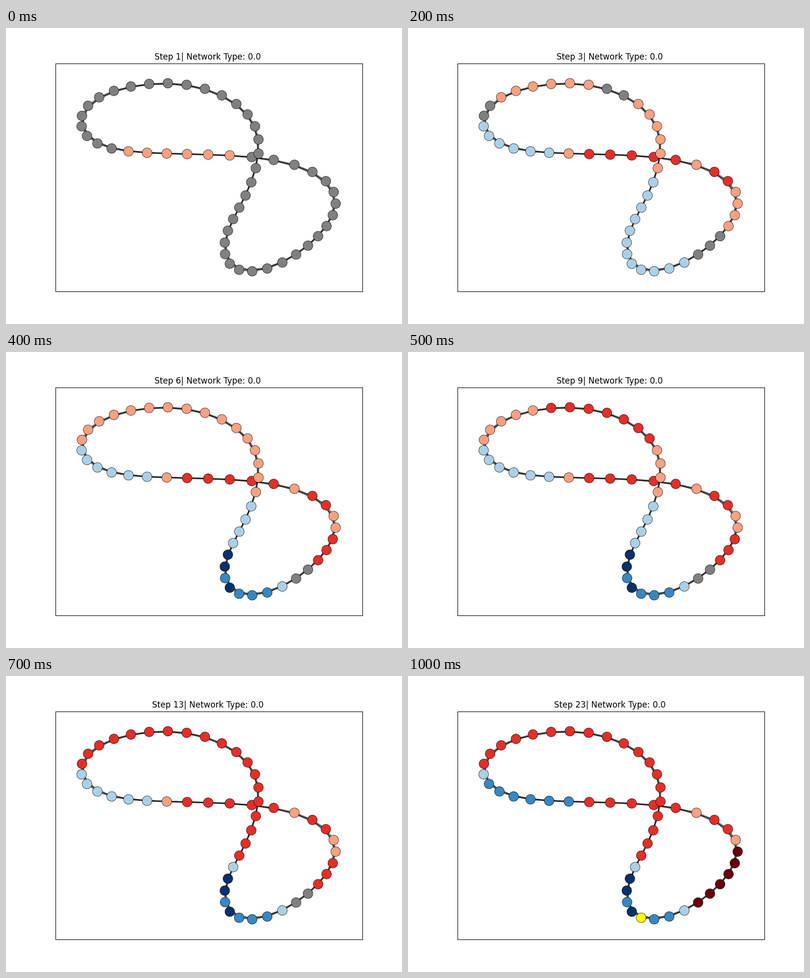
A matplotlib script for the animation above (1100 ms loop, 800 by 600 pixels).

```python
import matplotlib.pyplot as plt
import numpy as np
from matplotlib.animation import FuncAnimation
from matplotlib.collections import LineCollection

N = 50      # nodes on the ring
GAP = 3     # nodes from one key point to the next
YELLOW = 4

# Key points of the looped ring, in stage pixels (y down), from node 1 on
KEYS = np.array([
    (247.5, 250), (366, 255.5), (496.5, 261.5), (619, 291.7), (666, 356),
    (630.5, 422), (558.3, 475.3), (471, 490), (442, 435), (471.3, 364),
    (504.7, 284), (503, 199.3), (436, 136.5), (327, 112), (218, 127.5),
    (153.5, 178), (184.7, 234),
])

# Step number: opinion changes as (level, first node, last node)
STEPS = {
    1: [(1, 1, 6)],
    2: [(-1, 47, 52), (1, 3, 15), (2, 4, 8), (2, 10, 11), (1, 31, 36), (1, 39, 44)],
    3: [(-1, 19, 30)],
    4: [(-2, 20, 24), (-3, 25, 26), (-3, 23, 23)],
    6: [(1, 45, 46), (1, 37, 38), (2, 14, 16)],
    9: [(2, 35, 41)],
    11: [(2, 40, 46)],
    13: [(2, 28, 34)],
    16: [(-1, 3, 3)],
    19: [(-2, 48, 53)],
    23: [(3, 13, 18), (YELLOW, 22, 22)],
}


def harmonics(t):
    """Sines and cosines of the ring angle, one row per node."""
    angle = 2 * np.pi * np.outer(t, np.arange(1, len(KEYS) // 2 + 1)) / N
    return np.hstack([np.ones((len(t), 1)), np.cos(angle), np.sin(angle)])


def ring():
    """Smooth closed curve through the key points, sampled at each node."""
    key_nodes = 1 + GAP * np.arange(len(KEYS))
    weights = np.linalg.solve(harmonics(key_nodes), KEYS)
    return harmonics(np.arange(N)) @ weights


def color(level):
    if level == YELLOW:
        return "yellow"
    if level == 0:
        return "gray"
    cmap = plt.cm.Reds if level > 0 else plt.cm.Blues
    return cmap(abs(level) / 3)


def levels_at(i):
    levels = np.zeros(N, int)
    for changes in list(STEPS.values())[:i + 1]:
        for level, first, last in changes:
            levels[np.arange(first, last + 1) % N] = level
    return levels


nodes = ring()
fig, ax = plt.subplots(figsize=(8, 6), dpi=100)
ax.set(xlim=(100, 720), ylim=(534, 72), xticks=[], yticks=[])

# Each node is linked to its two nearest neighbours on both sides
edges = [(nodes[i], nodes[(i + d) % N]) for i in range(N) for d in (1, 2)]
ax.add_collection(LineCollection(edges, colors="black", linewidths=2,
                                 alpha=0.5, zorder=1), autolim=False)
dots = ax.scatter(*nodes.T, s=200, c="gray", edgecolors="black",
                  linewidths=0.5, zorder=2)
title = ax.set_title("")


def update(i):
    dots.set_facecolor([color(v) for v in levels_at(i)])
    title.set_text(f"Step {list(STEPS)[i]}| Network Type: 0.0 ")
    return dots, title


anim = FuncAnimation(fig, update, frames=len(STEPS), interval=100,
                     repeat=True, repeat_delay=0)
plt.show()
```
